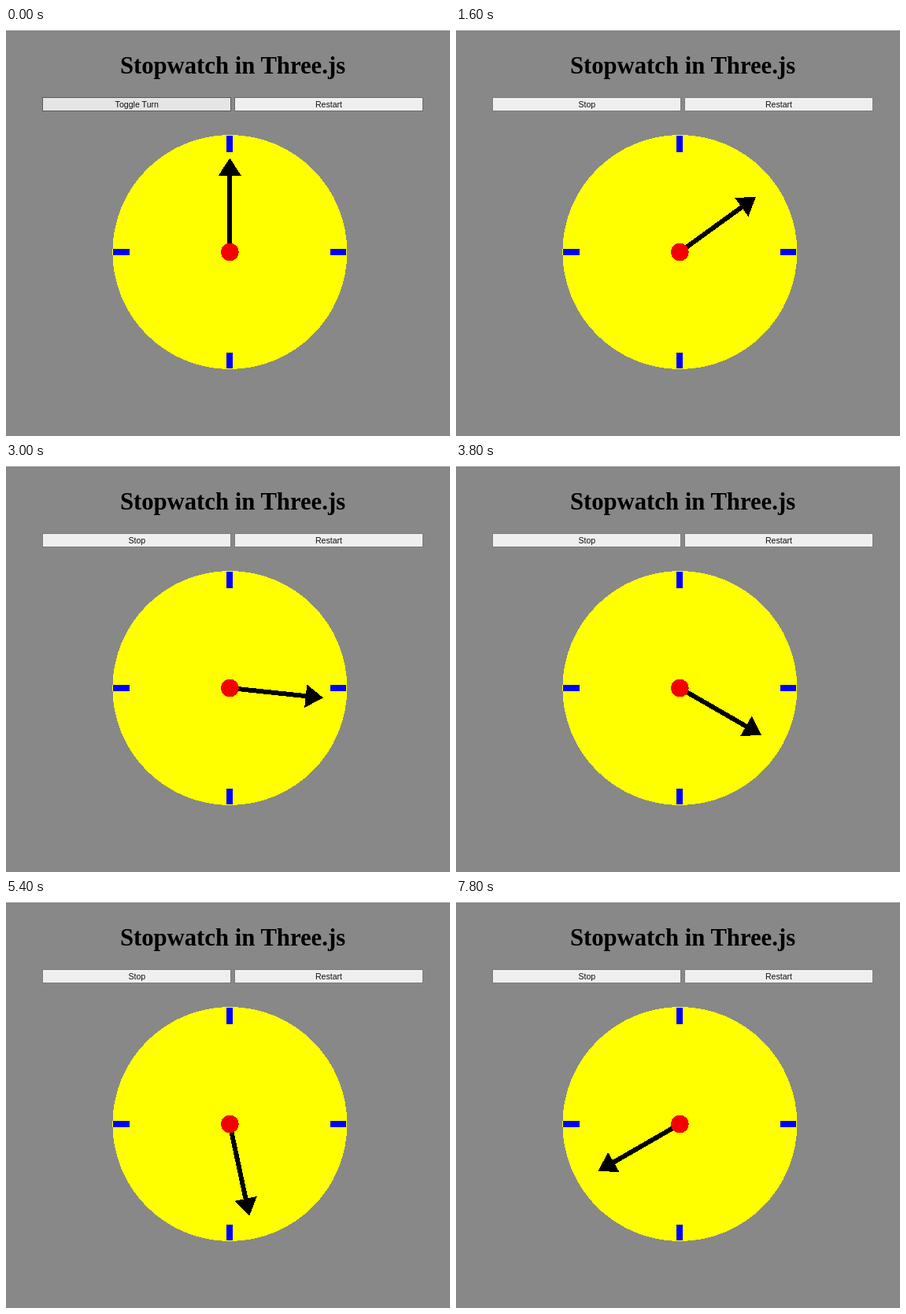
Write an HTML page that moves like this. It is 564 px wide and 519 px high and loops after 8 s.

```html
<!DOCTYPE html>
<html lang="en">
<head>
<meta charset="utf-8">
<title>Stopwatch</title>
<style>
  html, body { margin: 0; width: 100%; height: 100%; overflow: hidden; background: #888; }
  svg { display: block; width: 564px; height: 519px; }
  text { text-anchor: middle; }
  h1, .title { font: bold 30.7px "Liberation Serif", Times, serif; }
  .label { font: 10.6px "Liberation Sans", Arial, sans-serif; fill: #111; }
  .button { fill: #efefef; stroke: #7c7c7c; }
  .idle .button { stroke: #6c6c6c; }
  .idle #toggle { fill: #e5e5e5; stroke: #5a5a5a; }
  .dial { shape-rendering: crispEdges; }
</style>
</head>
<body>
<svg id="stage" class="idle" viewBox="0 0 564 519">
  <rect width="564" height="519" fill="#888"/>
  <rect width="564" height="3" fill="#fff"/>
  <text class="title" x="288" y="58">Stopwatch in Three.js</text>

  <rect id="toggle" class="button" x="46.5" y="88.5" width="239" height="17"/>
  <text id="caption" class="label" x="166.3" y="100.5">Toggle Turn</text>
  <rect class="button" x="290.5" y="88.5" width="239" height="17"/>
  <text class="label" x="410" y="100.5">Restart</text>

  <g class="dial" transform="translate(284.3 285)">
    <circle r="149" fill="#ff0"/>
    <path d="M0-148v20.5M0 148v-20.5M-148 0h20.5M148 0h-20.5" stroke="#00f" stroke-width="8"/>
    <path id="hand" d="M-3 0V-97H-14.7L0-119.5L14.7-97H3V0z"/>
    <circle r="11.3" fill="#f30000"/>
  </g>
</svg>
<script>
  const LOOP = 8000, TICK = 200, DEGREES = 6;
  const stage = document.getElementById('stage');
  const caption = document.getElementById('caption');
  const hand = document.getElementById('hand');
  const start = performance.now();

  function draw() {
    const time = (performance.now() - start) % LOOP;
    const tick = Math.floor(time / TICK);
    const running = tick > 0;
    // The first visible move covers two ticks.
    const angle = running ? (tick + 1) * DEGREES : 0;
    stage.classList.toggle('idle', !running);
    caption.textContent = running ? 'Stop' : 'Toggle Turn';
    hand.setAttribute('transform', `rotate(${angle})`);
    requestAnimationFrame(draw);
  }
  draw();
</script>
</body>
</html>
```
